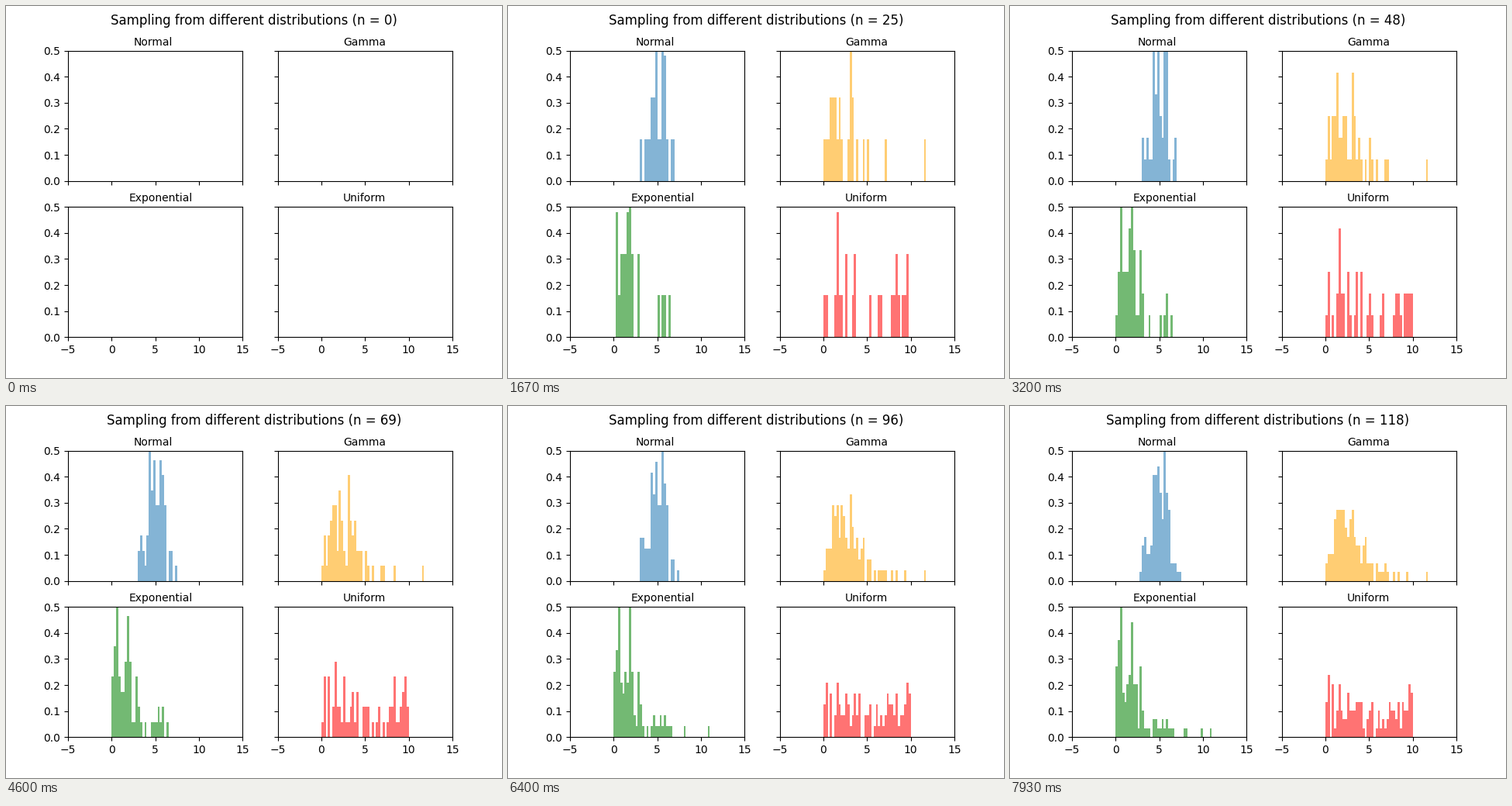
These frames come from a looping animation (640 px wide and 480 px high, 8000 ms). A matplotlib script:

```python
import numpy as np
import matplotlib.pyplot as plt
from matplotlib.animation import FuncAnimation

FRAMES = 120
LOOP_MS = 8000
LOW, HIGH, STEP = -5, 15, 0.25
EDGES = np.arange(LOW, HIGH + STEP, STEP)

plt.rcParams["font.family"] = "DejaVu Sans"
rng = np.random.default_rng(12)

# name, label position, colour, samples in the order they are drawn
PANELS = [
    ("Normal", 2.5, "tab:blue", rng.normal(5, 1, FRAMES)),
    ("Gamma", 2.5, "orange", rng.gamma(2, 1.5, FRAMES)),
    ("Exponential", 2.0, "green", rng.exponential(2, FRAMES)),
    ("Uniform", 2.5, "red", rng.uniform(0, 10, FRAMES)),
]

fig, axes = plt.subplots(2, 2, sharex=True, sharey=True,
                         figsize=(6.4, 4.8), dpi=100)
heading = fig.suptitle("", fontsize=12)
charts = []
for ax, (name, x, color, samples) in zip(axes.flat, PANELS):
    ax.set(xlim=(LOW, HIGH), ylim=(0, 0.5),
           xticks=range(LOW, HIGH + 1, 5), yticks=np.arange(6) / 10)
    ax.text(x, 0.52, name, fontsize=10)
    bars = ax.bar(EDGES[:-1], np.zeros(len(EDGES) - 1), STEP, align="edge",
                  color=color, alpha=0.55, linewidth=0)
    charts.append((bars, samples))


def update(n):
    heading.set_text(f"Sampling from different distributions (n = {n})")
    for bars, samples in charts:
        counts, _ = np.histogram(samples[:n], EDGES)
        for bar, count in zip(bars, counts):
            bar.set_height(count / (max(n, 1) * STEP))
    return []


anim = FuncAnimation(fig, update, frames=FRAMES, interval=LOOP_MS / FRAMES,
                     init_func=lambda: update(0), repeat=True, repeat_delay=0)
plt.show()
```
